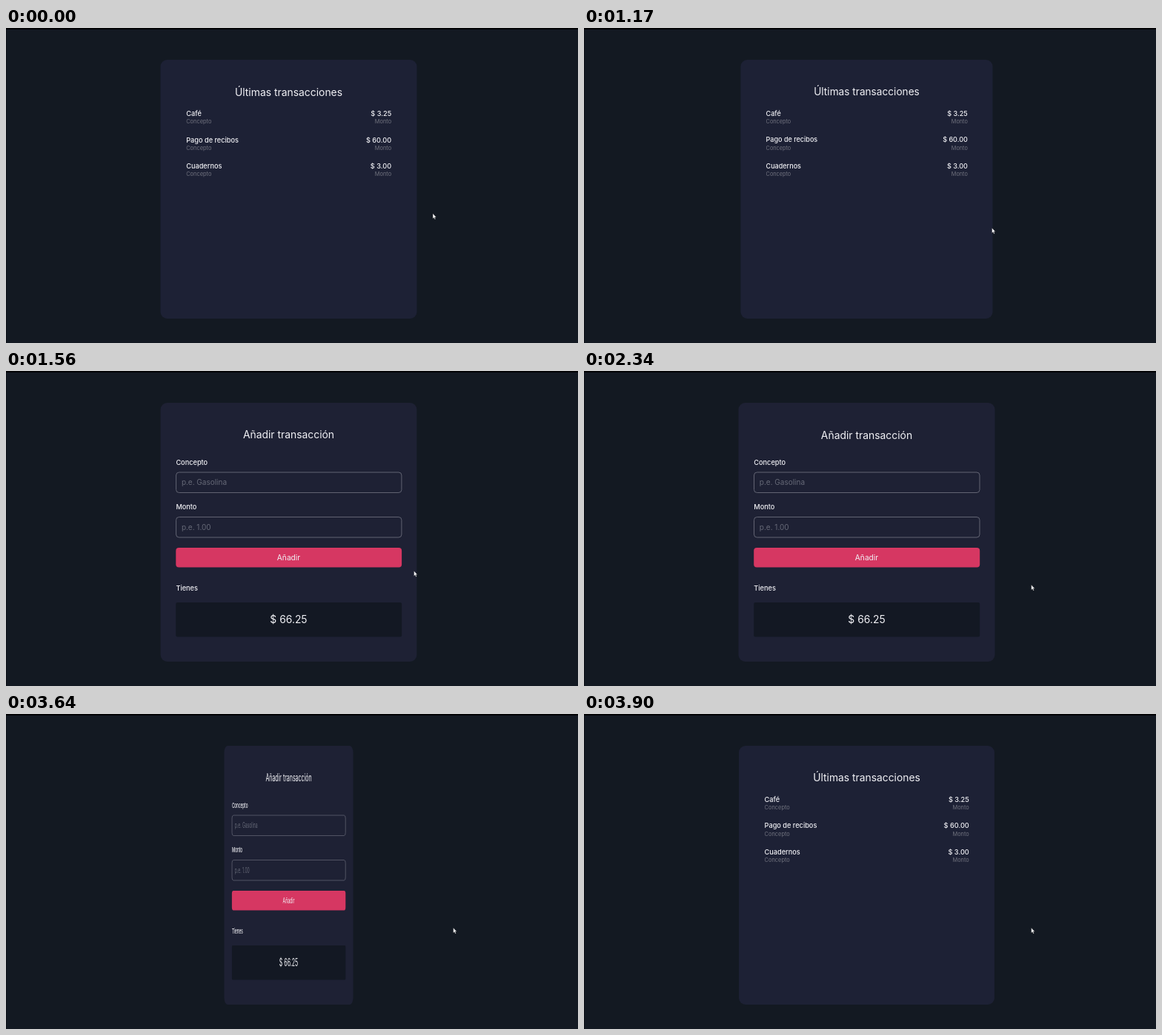
Recreate the animation shown at these times as an HTML page. Size 772x426 px, loop 4030 ms.

```html
<!DOCTYPE html>
<html lang="es">
<head>
<meta charset="utf-8">
<title>Transacciones</title>
<style>
  html, body { margin: 0; width: 100%; height: 100%; overflow: hidden; background: #131922; }
  svg { display: block; width: 772px; height: 426px; font-family: Inter, "Open Sans", sans-serif; }
  text { fill: #f1f1f5; font-size: 9.3px; white-space: pre; }
  .title { font-size: 13.9px; }
  .strong { font-weight: 500; font-size: 9.2px; }
  .sub { font-size: 7.45px; fill: #70727e; }
  .hint { font-size: 10px; fill: #666977; }
  .mid { text-anchor: middle; }
  .end { text-anchor: end; }
  .field { fill: none; stroke: #626473; }
</style>
</head>
<body>
<svg viewBox="0 0 772 426">
  <rect width="772" height="2" fill="#010104"/>
  <rect y="2" width="1" height="424" fill="#0c1017"/>

  <g id="front">
    <rect x="208.5" y="43" width="346" height="350" rx="9" fill="#1d2135"/>
    <text class="title mid" x="381.5" y="91.5">Últimas transacciones</text>
    <g id="rows"></g>
  </g>

  <g id="back">
    <rect x="208.5" y="43" width="346" height="350" rx="9" fill="#1e2134"/>
    <text class="title mid" x="381.5" y="91.5">Añadir transacción</text>
    <text class="strong" x="229.3" y="127">Concepto</text>
    <rect class="field" x="229.5" y="137" width="304.5" height="27.5" rx="4"/>
    <text class="hint" x="236.8" y="154.3">p.e. Gasolina</text>
    <text class="strong" x="229.3" y="187.3">Monto</text>
    <rect class="field" x="229.5" y="197.5" width="304.5" height="27.5" rx="4"/>
    <text class="hint" x="236.8" y="214.7">p.e. 1.00</text>
    <rect x="229.2" y="239" width="305" height="26.5" rx="4" fill="#d63762"/>
    <text class="mid" x="381.5" y="255.8" style="font-size:10.2px">Añadir</text>
    <text class="strong" x="229.3" y="296.6">Tienes</text>
    <rect x="229.2" y="313" width="305" height="46.5" rx="2" fill="#131823"/>
    <text class="title mid" x="381.5" y="341">$ 66.25</text>
  </g>

  <path id="cursor" d="M0 0V7.2L1.6 5.8L2.7 8.2L3.9 7.6L2.8 5.3H4.9Z" fill="#f4f4f6" stroke="#0b0e14" stroke-width=".4"/>
</svg>
<script>
const LOOP = 4030, TICK = 130, CENTER = 381.5;
const $ = id => document.getElementById(id);

const items = [["Café", "3.25"], ["Pago de recibos", "60.00"], ["Cuadernos", "3.00"]];
$("rows").innerHTML = items.map(([name, sum], i) => {
  const y = 119 + 35.5 * i;
  return `<text class="strong" x="243.2" y="${y}">${name}</text>
    <text class="sub" x="243.2" y="${y + 10.3}">Concepto</text>
    <text class="strong end" x="520.2" y="${y}">$ ${sum}</text>
    <text class="sub end" x="520.2" y="${y + 10.3}">Monto</text>`;
}).join("");

// [time, card angle in degrees]; the back shows from 90 to 270
const turns = [
  [0, 0], [1170, 10.6], [1300, 89.8], [1430, 155], [1560, 178], [1690, 180],
  [3510, 187.5], [3640, 239.8], [3770, 317], [3900, 355.6]
];

// [time, x, y] of the pointer tip
const moves = [
  [0, 576, 250.7], [780, 572, 254], [910, 562, 262], [1040, 553, 269], [1170, 550.5, 270.2],
  [2080, 563, 275], [2210, 592, 285.5], [2340, 603.6, 289]
];

const at = (steps, t) => steps.findLast(s => s[0] <= t);

function draw(now) {
  const t = Math.floor((now % LOOP) / TICK + 1e-6) * TICK;
  const [, angle] = at(turns, t);
  const [, x, y] = at(moves, t);
  const cos = Math.cos(angle * Math.PI / 180);
  const [shown, hidden] = cos > 0 ? [$("front"), $("back")] : [$("back"), $("front")];
  hidden.style.display = "none";
  shown.style.display = "";
  shown.setAttribute("transform", `translate(${CENTER} 0) scale(${Math.abs(cos)} 1) translate(${-CENTER} 0)`);
  $("cursor").setAttribute("transform", `translate(${x} ${y})`);
}

const start = performance.now();
function frame() {
  draw(performance.now() - start);
  requestAnimationFrame(frame);
}
frame();
</script>
</body>
</html>
```
